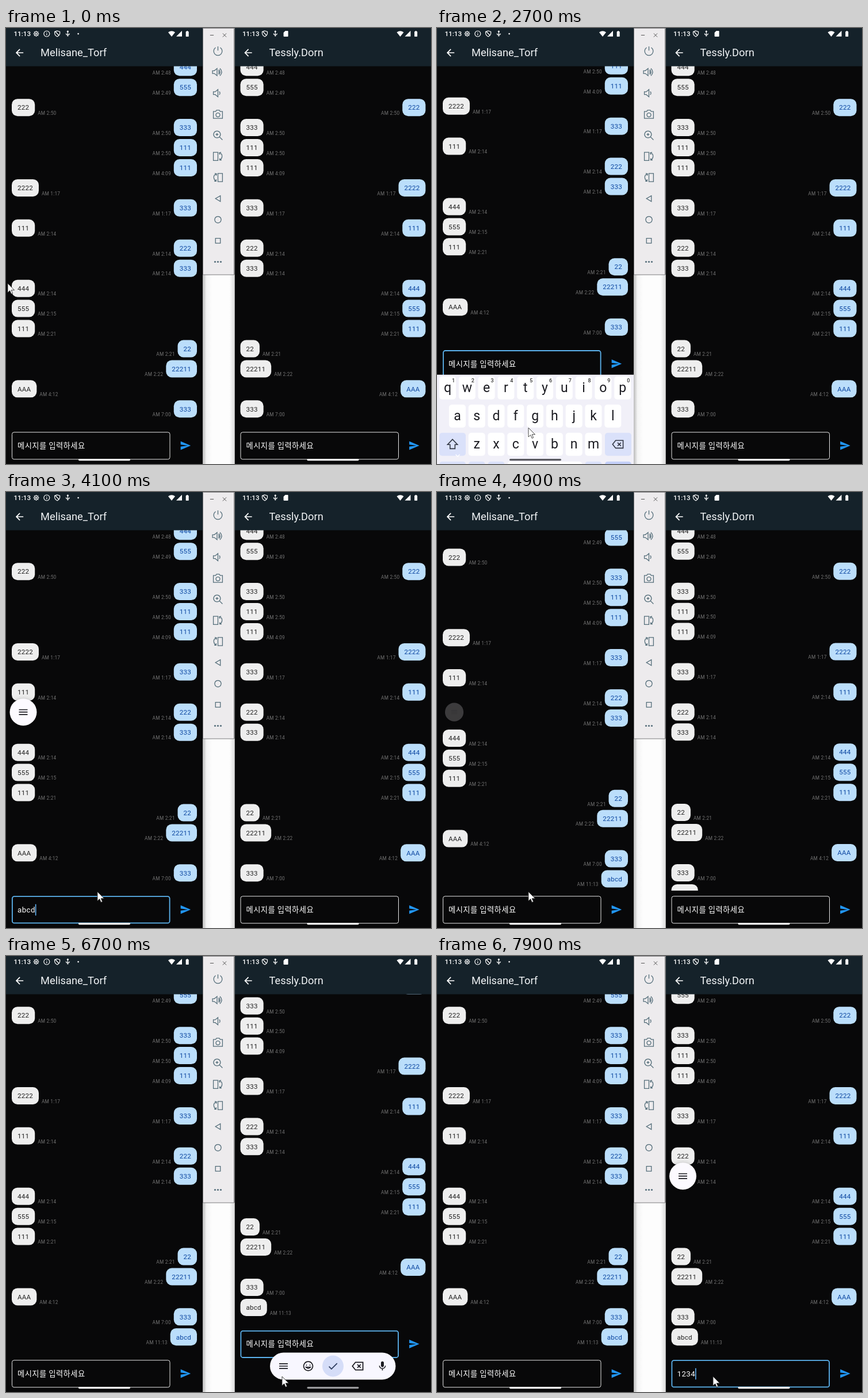
Write an HTML page with a canvas that moves like this. It is 739x758 px and loops after 8 s.

```html
<!DOCTYPE html>
<html lang="ko">
<head>
<meta charset="utf-8">
<title>Chat on two phones</title>
<style>
html, body { margin: 0; width: 100%; height: 100%; overflow: hidden; background: #080809; }
canvas { display: block; }
</style>
</head>
<body>
<canvas width="739" height="758"></canvas>
<script>
const g = document.querySelector('canvas').getContext('2d');
const LOOP = 8000, DP = 0.832, PITCH = 42 * DP;
const FONT = 'Roboto, "Noto Sans CJK KR", "Noto Sans CJK JP", sans-serif';
const HINT = '메시지를 입력하세요';
const SENT = 4800;

// '>' is sent by the left phone, '<' by the right one
const messages = `>444 2:48,>555 2:49,<222 2:50,>333 2:50,>111 2:50,>111 4:09,<2222 1:17,>333 1:17,<111 2:14,
>222 2:14,>333 2:14,<444 2:14,<555 2:15,<111 2:21,>22 2:21,>22211 2:22,<AAA 4:12,>333 7:00,>abcd 11:13`
  .split(/,\s*/).map(m => {
    const [body, time] = m.slice(1).split(' ');
    return { fromLeft: m[0] === '>', body, time: 'AM ' + time };
  });

// Icons on a 24-unit grid
const ICON = {
  back: 'M20 11H7.83l5.59-5.59L12 4l-8 8 8 8 1.41-1.41L7.83 13H20z',
  send: 'M2 21L23 12 2 3v7l15 2-15 2z',
  menu: 'M3 18h18v-2H3zm0-5h18v-2H3zm0-7v2h18V6z',
  check: 'M9 16.17L4.83 12l-1.42 1.41L9 19 21 7l-1.41-1.41z',
  erase: 'M8.5 5H22V19H8.5L3 12zM12 9l6 6M18 9l-6 6',
  mic: 'M12 14c1.66 0 3-1.34 3-3V5a3 3 0 0 0-6 0v6c0 1.66 1.34 3 3 3zm5.3-3c0 3-2.54 5.1-5.3 5.1S6.7 14 6.7 11H5c0 3.41 2.72 6.23 6 6.72V21h2v-3.28c3.28-.48 6-3.3 6-6.72z',
  smile: 'M12 3a9 9 0 1 0 .01 0zM8.5 9v2M15.5 9v2M7.5 14q4.5 5 9 0z',
  shift: 'M12 3L3 12.5H7.5V20H16.5V12.5H21z',
  wifi: 'M12 22L0 7Q12-2 24 7z',
  signal: 'M2 22H22V2z',
  battery: 'M15.7 4H14V2h-4v2H8.3Q7 4 7 5.3V20.7Q7 22 8.3 22h7.4Q17 22 17 20.7V5.3Q17 4 15.7 4z',
  gear: 'M12 5a7 7 0 1 0 .01 0zM12 9.5a2.5 2.5 0 1 0 .01 0zM12 2v3M12 19v3M2 12h3M19 12h3M5 5l2 2M17 17l2 2M19 5l-2 2M7 17l-2 2',
  info: 'M12 2a10 10 0 1 0 .01 0zM12 11v6M12 6.5v2',
  shield: 'M12 2L21 5V11Q20 18 12 22 4 18 3 11V5zM5 4L18 18',
  usb: 'M12 2V19M9 5l3-3 3 3M6 11q0 5 6 5 6 0 6-5M10 20h4',
  card: 'M10 2H18Q20 2 20 4V20Q20 22 18 22H6Q4 22 4 20V8z',
  power: 'M12 2V11M7 4.5a9.3 9.3 0 1 0 10 0',
  volume: 'M2 9H6L12 4V20L6 15H2zM15 8.5q3 3.5 0 7',
  louder: 'M17.5 6q5.5 6 0 12M20 3.5q8 8.5 0 17',
  camera: 'M2 6H7L9 3H15L17 6H22V21H2zM12 9a4.5 4.5 0 1 0 .01 0z',
  zoom: 'M10 2.5a7.5 7.5 0 1 0 .01 0zM15.5 15.5L22 22M10 7v6M7 10h6',
  turn: 'M2 3H12V21H2zM15 4q7 2 6 9-1 5-5 7M19 3l-4 1 1 4M20 20h-4v-4',
  triangle: 'M18 5V19L6 12z',
  circle: 'M12 4a8 8 0 1 0 .01 0z',
  square: 'M6 6H18V18H6z',
  minus: 'M7 12H17',
  cross: 'M7 7L17 17M17 7L7 17',
  chevron: 'M5 9l7 7 7-7'
};
for (const k in ICON) ICON[k] = new Path2D(ICON[k]);

const clamp = v => Math.max(0, Math.min(1, v));
const ease = (t, start, length) => 1 - (1 - clamp((t - start) / length)) ** 3;
const passed = (t, times) => times.filter(x => t >= x).length;

// Outlined when a line width is given, filled otherwise
function icon(name, x, y, size, color, line) {
  const s = size / 24;
  g.save();
  g.translate(x - size / 2, y - size / 2);
  g.scale(s, s);
  if (line) {
    g.strokeStyle = color;
    g.lineWidth = line / s;
    g.stroke(ICON[name]);
  } else {
    g.fillStyle = color;
    g.fill(ICON[name]);
  }
  g.restore();
}

function box(x, y, w, h, r, color) {
  g.fillStyle = color;
  g.beginPath();
  g.roundRect(x, y, w, h, r);
  g.fill();
}

function label(s, x, y, size, color, { gap = 0, align = 'left', weight = 400 } = {}) {
  g.font = `${weight} ${size}px ${FONT}`;
  g.letterSpacing = gap + 'px';
  g.textAlign = align;
  g.fillStyle = color;
  g.fillText(s, x, y);
  return g.measureText(s).width;
}

function shadowed(draw) {
  g.save();
  g.shadowColor = 'rgba(0,0,0,.35)';
  g.shadowBlur = 8;
  g.shadowOffsetY = 2;
  draw();
  g.restore();
}

function bubble(m, own, y) {
  const size = 14 * DP, gap = 0.25 * DP;
  g.font = `400 ${size}px ${FONT}`;
  g.letterSpacing = gap + 'px';
  const w = g.measureText(m.body).width + 20;
  const x = own ? 332 - w : 10;
  box(x, y - 15, w, 30, 10, own ? '#bbdefb' : '#eeeeee');
  label(m.body, x + 10, y + 4.2, size, own ? '#0d47a1' : '#212121', { gap });
  label(m.time, own ? x - 5 : x + w + 5, y + 12.8, 10 * DP, '#727272', { gap, align: own ? 'right' : 'left' });
}

function inputBar(p) {
  const line = p.focus ? 1.8 : 1;
  g.strokeStyle = p.focus ? '#5cb3ee' : '#e6e6e6';
  g.lineWidth = line;
  g.beginPath();
  g.roundRect(10 + line / 2, 702.3 + line / 2, 275.5 - line, 48 - line, 3.5);
  g.stroke();
  const gap = 0.5 * DP, size = 16 * DP;
  const w = label(p.text || HINT, 20, 730.8, size, '#fff', { gap });
  if (p.caret) box(20 + (p.text ? w : 0), 716.5, 1.6, 20, 0.8, '#64b5f6');
  icon('send', 312, 726, 20, '#2196f3');
}

function floatingButton(amount) {
  if (amount <= 0) return;
  g.save();
  g.globalAlpha = amount;
  g.translate(30, 382.7);
  g.scale(0.6 + 0.4 * amount, 0.6 + 0.4 * amount);
  shadowed(() => box(-23.5, -23.5, 47, 47, 23.5, '#fcfaff'));
  icon('menu', 0, 0, 20, '#1b1b21');
  g.restore();
}

function key(x, y, w, color, letter) {
  box(x - w / 2, y - 20, w, 40, 5, color);
  if (letter) label(letter, x, y + 7, 23, '#1b1b21', { align: 'center' });
}

function keyboard(height) {
  const top = 758 - height, tint = '#dae1fa', step = 33.8;
  box(0, top, 342, 240, 0, '#f1f0f8');
  [...'qwertyuiop'].forEach((c, i) => {
    const x = 18.5 + i * step;
    key(x, top + 23, 29, '#fff', c);
    label((i + 1) % 10, x + 10, top + 13.5, 9, '#333', { align: 'center', weight: 500 });
  });
  [...'asdfghjkl'].forEach((c, i) => key(35.4 + i * step, top + 72, 29, '#fff', c));
  [...'zxcvbnm'].forEach((c, i) => key(69.2 + i * step, top + 121, 29, '#fff', c));
  key(27, top + 121, 46, tint);
  key(315, top + 121, 46, tint);
  icon('shift', 27, top + 121, 23, '#333844', 1.6);
  icon('erase', 314, top + 121, 23, '#333844', 1.6);
  const y = top + 171;
  key(27, y, 46, tint);
  label('?123', 27, y + 5, 13, '#333844', { align: 'center' });
  key(69.2, y, 29, tint, ',');
  key(103, y, 29, tint);
  icon('smile', 103, y, 18, '#333844', 1.4);
  key(187.5, y, 130, '#fff');
  key(272, y, 29, tint, '.');
  key(315, y, 46, '#c3cff8');
  icon('check', 315, y, 20, '#333844');
  icon('chevron', 36, 743, 12, '#fff', 1.3);
}

function imeStrip(amount) {
  const y = 713 + 80 * (1 - Math.min(1, amount * 1.5));
  shadowed(() => box(61.5, y - 23.5, 218.5, 47, 23.5, '#f8f7ff'));
  box(152.5, y - 18.5, 37, 37, 18.5, '#d5ddf8');
  icon('menu', 85, y, 20, '#1b1b21');
  icon('smile', 128, y, 21, '#1b1b21', 1.7);
  icon('check', 171, y, 21, '#2d3c5e');
  icon('erase', 213.5, y, 23, '#1b1b21', 1.8);
  icon('mic', 257, y, 20, '#1b1b21');
}

function phone(p) {
  g.save();
  g.translate(p.x, 0);
  g.beginPath();
  g.rect(0, 0, 342, 758);
  g.clip();
  box(0, 0, 342, 758, 0, '#080809');

  g.save();
  g.beginPath();
  g.rect(0, 66, 342, 627 - p.lift);
  g.clip();
  messages.slice(0, p.arrived ? 19 : 18).forEach((m, i) =>
    bubble(m, m.fromLeft === p.isLeft, 662.3 + (i - 17 - p.scroll) * PITCH - p.lift));
  g.restore();

  g.save();
  g.translate(0, -p.lift);
  inputBar(p);
  g.restore();

  box(0, 0, 342, 66.5, 0, '#15222a');
  label('11:13', 13.5, 14, 14 * DP, '#fff', { weight: 500 });
  const status = p.isLeft ? ['gear', 'info', 'shield', 'usb'] : ['shield', 'usb', 'card'];
  status.forEach((n, i) => icon(n, 52.5 + i * 18.3, 10, 12, '#fff', n === 'card' ? 0 : 1.2));
  if (p.isLeft) box(124.3, 8.8, 2.6, 2.6, 1.3, '#fff');
  icon('wifi', 288, 10, 12, '#fff');
  icon('signal', 301, 9.7, 12, '#fff');
  icon('battery', 315.2, 10, 12, '#fff');
  icon('back', 23.5, 43, 20, '#fff');
  label(p.name, 60, 49, 22 * DP, '#f1f4f6');

  if (p.keys > 0) keyboard(p.keys);
  if (p.strip > 0) imeStrip(p.strip);
  floatingButton(p.button);
  box(126, 749, 90, 3.2, 1.6, p.keys > 20 ? '#5a5a60' : p.strip > 0.1 ? '#9a9a9c' : '#fff');
  g.restore();
}

function emulatorPanel() {
  box(342, 0, 55.5, 758, 0, '#fdfdfd');
  const shade = g.createLinearGradient(342, 0, 397, 0);
  shade.addColorStop(0, '#bbb');
  shade.addColorStop(0.12, '#f4f4f4');
  shade.addColorStop(0.3, '#fdfdfd');
  shade.addColorStop(0.85, '#fdfdfd');
  shade.addColorStop(1, '#ddd');
  box(342, 429, 55.5, 329, 0, shade);
  box(342, 0, 55, 429.5, 0, '#7c7c7e');
  box(343, 1, 53, 427.5, 0, '#edebed');
  const ink = '#546e7a';
  icon('minus', 358, 12.5, 15, '#555', 1);
  icon('cross', 380, 12.5, 15, '#555', 1);
  ['power', 'volume', 'volume', 'camera', 'zoom', 'turn', 'turn', 'triangle', 'circle', 'square'].forEach((n, i) => {
    const y = 40 + i * 36.65;
    g.save();
    g.translate(i === 1 ? 367 : 368.5, y);
    if (i === 6) g.scale(-1, 1);
    icon(n, 0, 0, i > 6 ? 17 : 19, ink, 1.3);
    if (i === 1) icon('louder', -1, 0, 18, ink, 1.3);
    g.restore();
  });
  for (const x of [363.5, 368.5, 373.5]) box(x - 1.6, 404.9, 3.2, 3.2, 1.6, ink);
}

const path = [[50, 3, 444], [900, 159, 695], [5450, 159, 695], [5700, 404, 703], [6300, 480, 731]];
const arrow = new Path2D('M0 0V16L3.7 12.5 6.2 18.3 8.6 17.2 6.2 11.7H11.5z');

function pointer(t) {
  const i = Math.max(1, Math.min(path.length - 1, passed(t, path.map(k => k[0]))));
  const [a, b] = [path[i - 1], path[i]];
  const p = clamp((t - a[0]) / (b[0] - a[0]));
  g.save();
  g.translate(a[1] + (b[1] - a[1]) * p, a[2] + (b[2] - a[2]) * p);
  g.fillStyle = '#fff';
  g.strokeStyle = '#333';
  g.lineWidth = 0.9;
  g.fill(arrow);
  g.stroke(arrow);
  g.restore();
}

function draw(t) {
  const keys = u => 225 * (ease(u, 2604, 300) - ease(u, 3050, 250));
  const strip = ease(t, 6603, 300) - ease(t, 7400, 250);
  const open = t >= 1100 && t < SENT;
  g.clearRect(0, 0, 739, 758);
  phone({
    x: 0, isLeft: true, name: 'Melisane_Torf',
    arrived: t >= SENT, scroll: ease(t, SENT, 300),
    focus: open,
    text: open ? 'abcd'.slice(0, passed(t, [3000, 3150, 3800, 4100])) : '',
    caret: open && passed(t, [1100, 1650, 1900, 2400, 2900, 3600, 3800, 4600]) % 2,
    keys: keys(t), lift: keys(t - 12), strip: 0,
    button: ease(t, 3200, 200) - ease(t, SENT, 250)
  });
  phone({
    x: 397.5, isLeft: false, name: 'Tessly.Dorn',
    arrived: t >= SENT + 100, scroll: ease(t, SENT + 100, 300),
    focus: t >= 6400,
    text: '1234'.slice(0, passed(t, [7400, 7520, 7680, 7820])),
    caret: passed(t, [6400, 6600, 7100]) % 2,
    keys: 0, lift: 74 * strip, strip,
    button: ease(t, 7600, 200)
  });
  emulatorPanel();
  pointer(t);
}

function frame(now) {
  draw(now % LOOP);
  requestAnimationFrame(frame);
}
requestAnimationFrame(frame);
</script>
</body>
</html>
```
